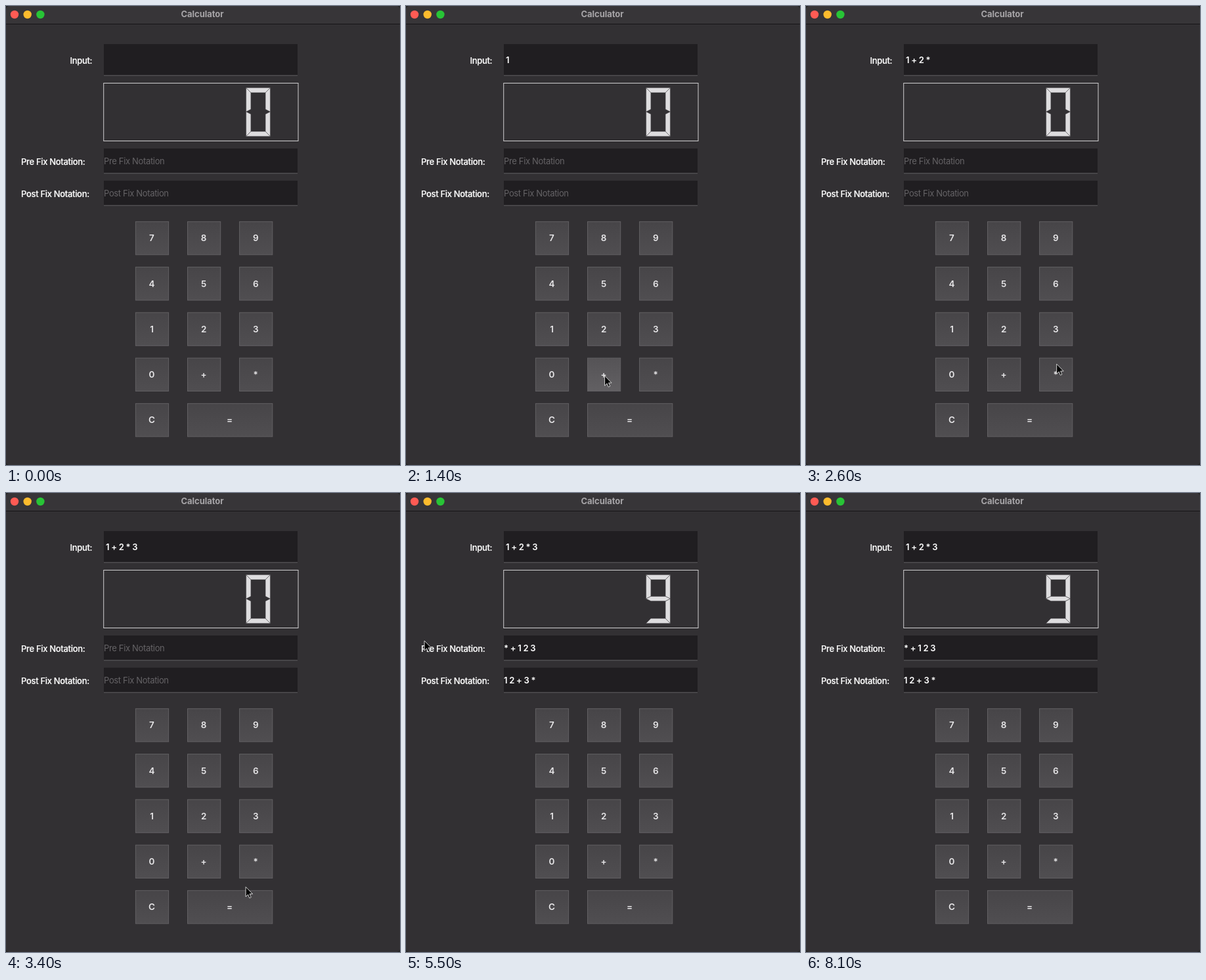
Animation of 600 by 699 pixels, one loop 8200 ms. Source, as an HTML page:

```html
<!DOCTYPE html>
<html lang="en">
<head>
<meta charset="utf-8">
<title>Calculator</title>
<style>
  html, body { margin: 0; width: 100%; height: 100%; overflow: hidden; background: #222; }
  svg { display: block; width: 100%; height: 100%; }
  text { font: 600 13px Inter, "Open Sans", sans-serif; fill: #fff; white-space: pre; }
  .title { font-weight: 700; fill: #a7a5a8; letter-spacing: -.05px; text-anchor: middle; }
  .label { font-weight: 500; letter-spacing: -.32px; stroke: #fff; stroke-width: .2px; }
  .value { letter-spacing: -.28px; }
  .hint { font-weight: 400; fill: #656366; letter-spacing: -.34px; }
  .key { font-size: 13.5px; fill: #e8e7e9; text-anchor: middle; }
</style>
</head>
<body>
<svg id="stage" viewBox="0 0 600 699">
  <defs>
    <linearGradient id="idle" x2="0" y2="1">
      <stop stop-color="#474548"/><stop offset="1" stop-color="#504e51"/>
    </linearGradient>
    <linearGradient id="lit" x2="0" y2="1">
      <stop stop-color="#555356"/><stop offset="1" stop-color="#626063"/>
    </linearGradient>
  </defs>
</svg>
<script>
const LOOP = 8200, STEP = 100;
const stage = document.getElementById('stage');

function add(tag, attrs, text) {
  const el = document.createElementNS('http://www.w3.org/2000/svg', tag);
  for (const k in attrs) el.setAttribute(k, attrs[k]);
  if (text !== undefined) el.textContent = text;
  return stage.appendChild(el);
}
const box = (x, y, width, height, fill, more) => add('rect', { x, y, width, height, fill, ...more });
const label = (x, y, cls, text) => add('text', { x, y, class: cls }, text);
const show = (el, on) => el.setAttribute('visibility', on ? 'visible' : 'hidden');

// Window
box(0, 0, 600, 699, '#323033', { rx: 5 });
add('path', { d: 'M0 27V6a6 6 0 0 1 6-6H594a6 6 0 0 1 6 6V27Z', fill: '#373538' });
box(0, 27, 600, 1, '#151416');
['#ff5b54', '#fdbb2d', '#28c436'].forEach((fill, i) =>
  add('circle', { cx: 13 + i * 19.7, cy: 13, r: 6.2, fill }));
label(299, 17, 'title', 'Calculator');

// Fields
function field(name, nameX, x, y, h) {
  const base = y + h / 2 + 5;
  box(149, y, 295, h, '#201e21');
  box(149, y + h - .7, 295, 1, '#626063');
  label(nameX, base + 1, 'label', name + ':');
  return label(x, base, 'value', '');
}
const input = field('Input', 97.5, 152, 58, 48);
const prefix = field('Pre Fix Notation', 23, 149, 217, 38);
const postfix = field('Post Fix Notation', 23, 149, 266, 38);

// Seven-segment display
box(148.7, 117.5, 296.3, 88, 'none', { stroke: '#d0cfd1' });
const L = 365.6, R = 402.4, TOP = 124.6, MID = 161, BOTTOM = 198.4, THICK = 7.3;
const segment = (...points) =>
  add('polygon', { points: points.join(' '), fill: '#dedddf', stroke: '#454346', 'stroke-width': .5 });
const flat = (y, dy) => segment([L, y], [R, y], [R - THICK, y + dy], [L + THICK, y + dy]);
const upright = (x, dx, y, dy) =>
  segment([x, y], [x + dx, y + dy], [x + dx, MID - dy / 2], [x, MID]);
flat(TOP, THICK);
flat(BOTTOM, -THICK);
upright(L, THICK, TOP, THICK);
upright(R, -THICK, TOP, THICK);
upright(R, -THICK, BOTTOM, -THICK);
const lowLeft = upright(L, THICK, BOTTOM, -THICK);
const middle = segment([L, MID], [L + THICK, MID - 3.6], [R - THICK, MID - 3.6],
  [R, MID], [R - THICK, MID + 3.6], [L + THICK, MID + 3.6]);

// Keypad
const keys = {};
function key(name, col, row, width = 50.2) {
  const x = 197.4 + col * 79.1, y = 328.4 + row * 69.25;
  const face = box(x, y, width, 50.4, 'url(#idle)', { stroke: '#626063' });
  label(x + width / 2 - .5, y + 30, 'key', name);
  keys[name] = { face, x: x + width / 2, y: y + 25 };
}
['789', '456', '123', '0+*'].forEach((line, row) =>
  [...line].forEach((c, col) => key(c, col, row)));
key('C', 0, 4);
key('=', 1, 4, 129.3);

const pointer = add('path', {
  d: 'M0 0V15L3.5 11.7 5.7 17 8.1 15.9 5.9 10.8H10.5Z',
  fill: '#000', stroke: '#e6e6e6', 'stroke-width': .9, 'stroke-linejoin': 'round'
});

// Keys are clicked in a steady rhythm, then the pointer shows the results
const SUM = '1+2*3', SOLVED = 3800;
const clickTime = i => 950 + i * 500;
const stops = [{ t: 100, x: 582, y: 552 }];
function visit(x, y, arrive, leave = arrive) {
  stops.push({ t: arrive, x, y }, { t: leave, x, y });
}
[...SUM].forEach((c, i) =>
  visit(keys[c].x + 1, keys[c].y + 2, clickTime(i) - 150, clickTime(i) + 50));
visit(361, 626, 3560, 4000);
visit(360, 618, 4300);
visit(359, 601, 5000);
visit(28, 225, 5500, 5900);
visit(343, 176, 6600, 6900);
visit(300, -20, 7700);

function pointerAt(t) {
  const i = stops.findIndex(s => s.t > t);
  if (i < 1) return null;
  const a = stops[i - 1], b = stops[i];
  const u = (t - a.t) / (b.t - a.t), k = u * u * (3 - 2 * u);
  return [a.x + (b.x - a.x) * k, a.y + (b.y - a.y) * k];
}

function fill(el, value, hint) {
  el.textContent = value || hint;
  el.setAttribute('class', value ? 'value' : 'hint');
}

function render(t) {
  let typed = '';
  [...SUM].forEach((c, i) => {
    const wait = clickTime(i) - t;
    if (wait <= 0) typed += c + ' ';
    keys[c].face.setAttribute('fill', wait > 0 && wait <= 150 ? 'url(#lit)' : 'url(#idle)');
  });
  input.textContent = typed;

  const solved = t >= SOLVED;
  fill(prefix, solved && '* + 1 2 3', 'Pre Fix Notation');
  fill(postfix, solved && '1 2 + 3 *', 'Post Fix Notation');
  show(middle, solved);
  show(lowLeft, !solved);

  const p = pointerAt(t);
  show(pointer, p);
  if (p) pointer.setAttribute('transform', `translate(${p})`);
}

const start = performance.now();
function tick() {
  const t = (performance.now() - start) % LOOP;
  render(Math.floor(t / STEP) * STEP);
  requestAnimationFrame(tick);
}
tick();
</script>
</body>
</html>
```
